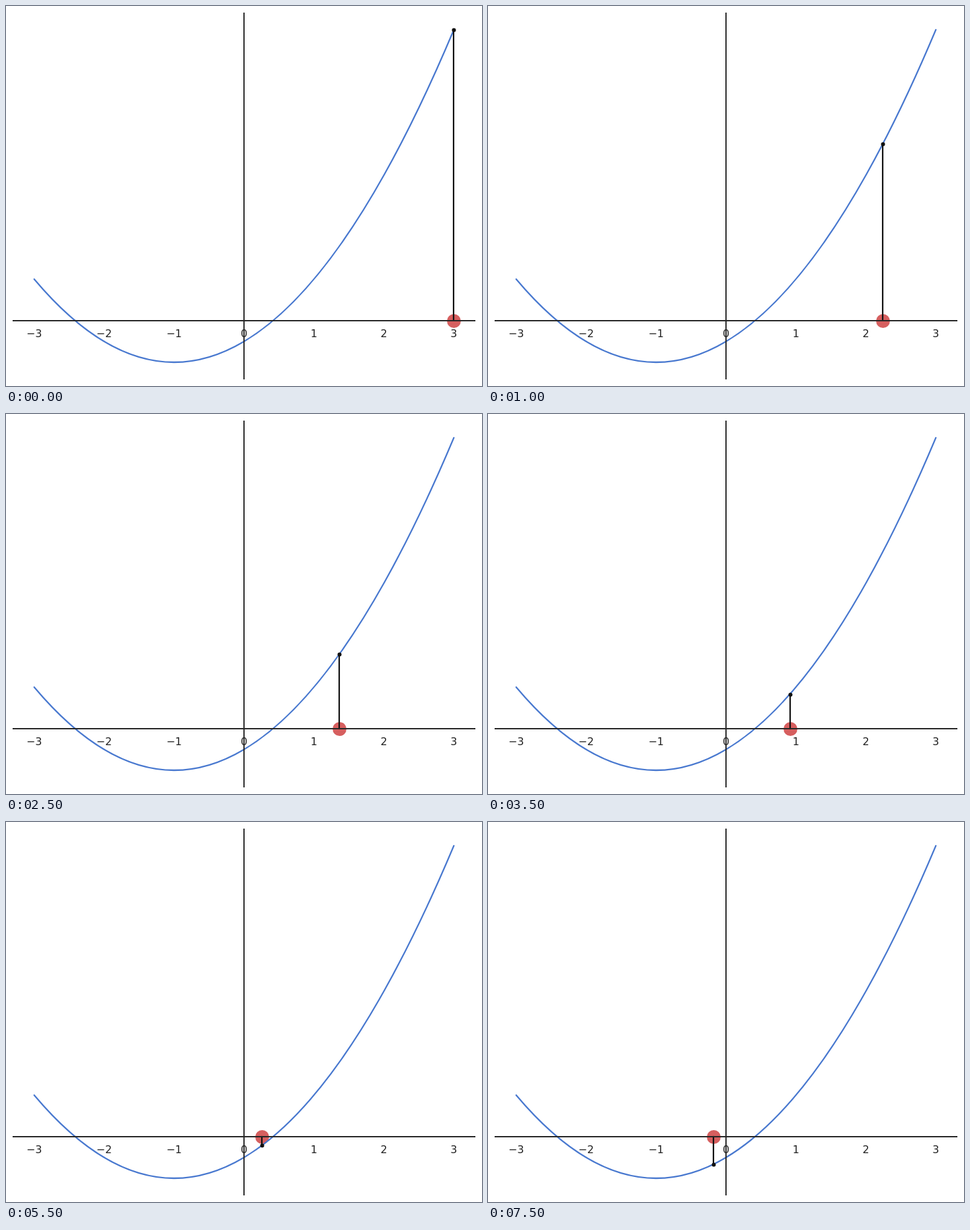
These frames come from a looping animation (720 by 576 pixels, 8000 ms). An HTML page:

```html
<!DOCTYPE html>
<html>
<head>
<meta charset="utf-8">
<style>
  html, body { margin: 0; width: 100%; height: 100%; overflow: hidden; background: #fff; }
  svg { display: block; }
  text { font: 16px "DejaVu Sans", sans-serif; fill: #262626; text-anchor: middle; }
</style>
</head>
<body>
<svg width="720" height="576" viewBox="0 0 720 576">
  <circle id="ball" r="10.5" fill="#d65f5f"/>
  <!-- y = x² + 2x − 1 on [−3, 3] as one quadratic Bézier -->
  <path d="M42.6 414Q360 792 677.4 36" fill="none" stroke="#4878cf" stroke-width="2.2" stroke-linecap="round"/>
  <path id="stem" stroke="#111" stroke-width="2.2" stroke-linecap="square"/>
  <circle id="dot" r="3" fill="#111"/>
  <path d="M10 477H710M360 10V566" stroke="#262626" stroke-width="1.9"/>
  <g id="labels"></g>
</svg>
<script>
const STEP = 500, STEPS = 16, RATE = 0.05;
const $ = id => document.getElementById(id);
const f = x => x * x + 2 * x - 1;
const px = x => 360 + 105.8 * x;
const py = y => 477 - 31.5 * y;

function set(el, attrs) {
  for (const k in attrs) el.setAttribute(k, attrs[k]);
}

for (let n = -3; n <= 3; n++) {
  const label = document.createElementNS("http://www.w3.org/2000/svg", "text");
  set(label, { x: px(n), y: 502 });
  label.textContent = String(n).replace("-", "\u2212");
  $("labels").append(label);
}

// Gradient descent from x = 3 with gradient 2x + 2
function descend(steps) {
  let x = 3;
  while (steps-- > 0) x -= RATE * (2 * x + 2);
  return x;
}

function draw(now) {
  const x = descend(Math.floor(now / STEP) % STEPS);
  const cx = Math.round(px(x)), cy = Math.round(py(f(x)));
  set($("ball"), { cx: cx + 0.5, cy: 477.5 });
  set($("dot"), { cx: cx + 0.5, cy: cy + 0.5 });
  set($("stem"), { d: `M${cx} 477V${cy}` });
}

const start = performance.now();
function tick() {
  draw(performance.now() - start);
  requestAnimationFrame(tick);
}
tick();
</script>
</body>
</html>
```
